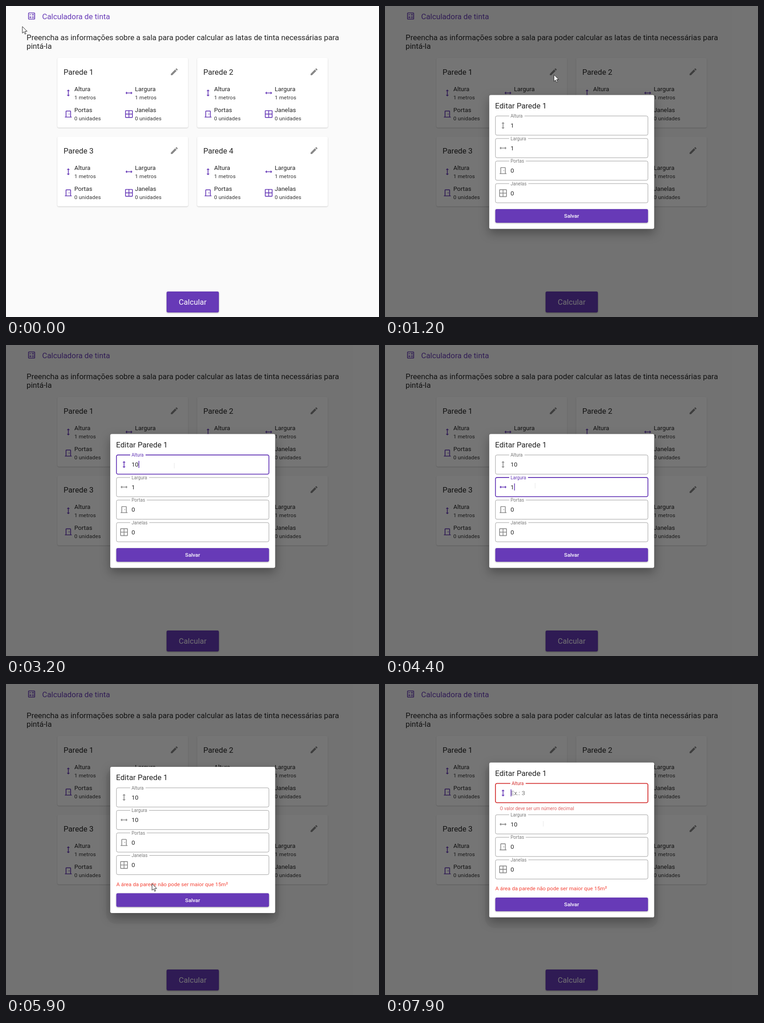
An HTML page for the animation above (8 s loop, 820 by 683 pixels).

```html
<!DOCTYPE html>
<html lang="pt-BR">
<head>
<meta charset="utf-8">
<title>Calculadora de tinta</title>
<style>
  html, body { margin: 0; width: 100%; height: 100%; overflow: hidden; background: #fafafa; }
  svg { display: block; }
  text { font-family: Roboto, Arial, sans-serif; white-space: pre; }
  .card { fill: #fff; filter: drop-shadow(0 1px 1px rgba(0,0,0,.2)); }
  .raised { filter: drop-shadow(0 1.5px 1.5px rgba(0,0,0,.35)); }
  .dialog { fill: #fff; filter: drop-shadow(0 9px 11px rgba(0,0,0,.33)); }
  .pointer { fill: #fff; stroke: #222; stroke-width: 1; stroke-linejoin: round; }
</style>
</head>
<body>
<svg id="stage" width="820" height="683" viewBox="0 0 820 683">
  <g id="page"></g>
  <g id="modal"></g>
  <g id="cursor"></g>
</svg>
<script>
const DURATION = 8000, STEP = 100;
const PURPLE = '#673ab7', INK = '#242424', RED = '#f44336', DARK_RED = '#d32f2f';
const $ = id => document.getElementById(id);
const clamp = v => Math.max(0, Math.min(1, v));
const ramp = (t, start, length) => clamp((t - start) / length);

const ICONS = {
  height: 'M13 6.99h3L12 3 8 6.99h3v10.02H8L12 21l4-3.99h-3z',
  width: 'M6.99 11V8L3 12l3.99 4v-3h10.02v3L21 12l-3.99-4v3z',
  door: 'M19 19V5c0-1.1-.9-2-2-2H7c-1.1 0-2 .9-2 2v14H3v2h18v-2zM17 19H7V5h10zM13 11h2v2h-2z',
  window: 'M20 2H4c-1.1 0-2 .9-2 2v16c0 1.1.9 2 2 2h16c1.1 0 2-.9 2-2V4c0-1.1-.9-2-2-2zM20 11h-7V4h7zM11 4v7H4V4zM4 13h7v7H4zM13 20v-7h7v7z',
  edit: 'M3 17.25V21h3.75L17.81 9.94l-3.75-3.75zM20.71 7.04c.39-.39.39-1.02 0-1.41l-2.34-2.34c-.39-.39-1.02-.39-1.41 0l-1.83 1.83 3.75 3.75z',
  calc: 'M19 3H5c-1.1 0-2 .9-2 2v14c0 1.1.9 2 2 2h14c1.1 0 2-.9 2-2V5c0-1.1-.9-2-2-2zM19 19H5V5h14zM6.25 7.72h5v1.5h-5zM13 15.75h5v1.5h-5zM13 13.25h5v1.5h-5zM8 18h1.5v-2h2v-1.5h-2v-2H8v2H6V16h2zM14.09 10.95l1.41-1.41 1.41 1.41 1.06-1.06-1.41-1.42 1.41-1.41L16.91 6 15.5 7.41 14.09 6l-1.06 1.06 1.41 1.41-1.41 1.42z'
};

const icon = (name, cx, cy, color) =>
  `<path d="${ICONS[name]}" fill="${color}" fill-rule="evenodd" transform="translate(${cx - 10.08} ${cy - 10.08}) scale(.84)"/>`;
const text = (value, x, y, size, color = INK, extra = '') =>
  `<text x="${x}" y="${y}" font-size="${size}" fill="${color}" ${extra}>${value}</text>`;
const box = (x, y, w, h, extra) =>
  `<rect x="${x}" y="${y}" width="${w}" height="${h}" ${extra}/>`;
const mix = (from, to, k) => 'rgb(' + from.map((v, i) => Math.round(v + (to[i] - v) * k)) + ')';

function wallCard(number, x, y) {
  const stat = (name, dx, dy, label, value) =>
    icon(name, x + dx, y + dy, PURPLE) +
    text(label, x + dx + 13.2, y + dy - 4, 13.44) +
    text(value, x + dx + 13.2, y + dy + 14, 11.76, '#333', 'letter-spacing=".12"');
  return box(x, y, 287.3, 153, 'rx="3.4" class="card"') +
    text('Parede ' + number, x + 13.5, y + 37, 16.8) +
    (number === 1 ? `<circle id="hover" cx="370" cy="144.5" r="20" fill="#ececec"/>` : '') +
    icon('edit', x + 257, y + 30.5, '#888') +
    stat('height', 24, 77, 'Altura', '1 metros') +
    stat('width', 157.3, 77, 'Largura', '1 metros') +
    stat('door', 24, 123.3, 'Portas', '0 unidades') +
    stat('window', 157.3, 123.3, 'Janelas', '0 unidades');
}

$('page').innerHTML =
  box(0, 0, 820, 683, 'fill="#fafafa"') +
  icon('calc', 56.3, 22, PURPLE) +
  text('Calculadora de tinta', 79.5, 28.5, 16.8, PURPLE) +
  text('Preencha as informações sobre a sala para poder calcular as latas de tinta necessárias para', 45.3, 74.7, 16.8) +
  text('pintá-la', 45.3, 94.4, 16.8) +
  [1, 2, 3, 4].map(n => wallCard(n, n % 2 ? 113 : 420.2, n < 3 ? 114 : 287)).join('') +
  box(353, 627, 115, 46, `rx="3.4" fill="${PURPLE}" class="raised"`) +
  text('Calcular', 410.3, 656.3, 16.8, '#fff', 'text-anchor="middle"');

// name, label, label width
const FIELDS = [
  ['height', 'Altura', 26.8], ['width', 'Largura', 34.4],
  ['door', 'Portas', 29.4], ['window', 'Janelas', 35.1]
];

// Value in force from the given time on
const at = (table, t) => table.filter(row => row[0] <= t).pop();

const VALUES = [
  [[0, '1'], [3200, '10'], [7500, '1'], [7700, '']],
  [[0, '1'], [4600, '10']],
  [[0, '0']],
  [[0, '0']]
];
const CARET = [[0, 0], [2100, 1], [2500, 0], [3000, 1], [3700, 0], [4300, 1], [5200, 0], [7200, 1]];

function focusLevels(t) {
  return [
    ramp(t, 2030, 167) - ramp(t, 4130, 200) + ramp(t, 7130, 167),
    ramp(t, 4130, 200) - ramp(t, 5130, 167),
    0, 0
  ];
}

function field(i, y, t, focus, invalid) {
  const [name, label, labelWidth] = FIELDS[i];
  const value = at(VALUES[i], t)[1];
  const bad = invalid > 0;
  const shake = bad ? -2.6 * Math.sin(invalid * Math.PI * 2) * (invalid < 1) : 0;
  const violet = [103, 58, 183];
  const line = bad ? DARK_RED : mix([158, 158, 158], violet, focus);
  let out =
    box(242.8, y, 335.2, 42.2, `rx="3.4" fill="none" stroke="${line}" stroke-width="${1 + .8 * focus}"`) +
    box(273 + shake, y - 2, labelWidth + 7, 4, 'fill="#fff"') +
    text(label, 276 + shake, y + 3.5, 10.08, bad ? DARK_RED : mix([122, 122, 122], violet, focus)) +
    icon(name, 259.5, y + 21, mix([138, 138, 138], violet, focus)) +
    (value ? text(value, 276, y + 25.6, 13.44) : bad ? text('Ex.: 3', 276, y + 25.6, 13.44, '#777') : '');
  if (focus > .3 && at(CARET, t)[1])
    out += box(276.3 + value.length * 7.55, y + 13, 1.6, 15.5, `fill="${PURPLE}"`);
  return out;
}

function modal(t) {
  if (t < 1200) return '';
  const areaError = t >= 5300;
  const invalid = ramp(t, 7660, 300);
  const grow = 19.4 * (1 - (1 - invalid) ** 3);
  const height = 294 + (areaError ? 27 : 0) + grow;
  const top = 342.5 - height / 2;
  const focus = focusLevels(t);
  const buttonTop = top + height - 43.5;
  const ripple = ramp(t, 5150, 550);
  let out = box(0, 0, 820, 683, 'fill="#000" fill-opacity=".54"');
  if (areaError)
    out += box(220, top + 2, 380, height + 21.5, 'rx="22" fill="#000" fill-opacity=".035"');
  out += box(229.2, top, 362.5, height, 'rx="3.4" class="dialog"') +
    text('Editar Parede 1', 242, top + 29.3, 16.8) +
    FIELDS.map((_, i) =>
      field(i, top + 46 + i * 49.5 + (i ? grow : 0), t, focus[i], i ? 0 : invalid)).join('');
  if (invalid)
    out += text('O valor deve ser um número decimal', 252.6, top + 104.5, 10.08, DARK_RED, `opacity="${.75 * invalid + .15}"`);
  if (areaError)
    out += text('A área da parede não pode ser maior que 15m²', 242.5, buttonTop - 16, 11.76, RED);
  out += box(242.5, buttonTop, 335.7, 30, `rx="3.4" fill="${PURPLE}" class="raised"`);
  if (t >= 4900 && t < 5800)
    out += box(242.5, buttonTop, 335.7, 30, 'rx="3.4" fill="#fff" fill-opacity=".08"');
  if (ripple > 0 && ripple < 1)
    out += `<clipPath id="clip">${box(242.5, buttonTop, 335.7, 30, 'rx="3.4"')}</clipPath>` +
      `<circle cx="322" cy="${buttonTop + 15}" r="${20 + 330 * ripple}" fill="#fff" fill-opacity="${.24 * (1 - ripple)}" clip-path="url(#clip)"/>`;
  return out + text('Salvar', 410.2, buttonTop + 19.3, 11.76, '#fff', 'font-weight="500" text-anchor="middle"');
}

const POINTERS = {
  arrow: '<path class="pointer" d="M0 0V14.6L3.4 11.5 5.7 16.8 8 15.8 5.7 10.6H10.4z"/>',
  hand: '<path class="pointer" d="M-1.5 1.5a1.5 1.5 0 0 1 3 0V7c1-.8 2.5-.5 2.8.6 1-.6 2.4-.3 2.6.8 1-.5 2.2 0 2.2 1.3V13c0 2-1 3-1.5 4v2H0v-2C-2 15-3 12.5-4.5 11c-1-1.2.6-2.8 2-1.7l1 1z"/>',
  beam: '<path d="M0-6V6" stroke="#e6e6e6" stroke-width="1"/>'
};
// time, x, y, pointer
const PATH = [
  [0, 36, 45, 'arrow'], [100, 44, 110, 'arrow'], [200, 54.5, 174, 'arrow'],
  [400, 90, 174, 'arrow'], [500, 180, 172, 'arrow'], [600, 280, 167, 'arrow'], [700, 350, 156, 'arrow'],
  [800, 372, 152, 'hand'], [1200, 371.5, 151, 'arrow'],
  [1500, 358, 188, 'arrow'], [1600, 343.5, 222, 'arrow'], [1700, 350, 240, 'arrow'], [1800, 370, 265, 'beam'],
  [3600, 330, 275, 'arrow'], [3700, 330, 309, 'beam'],
  [4700, 330, 416, 'arrow'], [4900, 322, 458, 'hand'], [5800, 322, 448, 'arrow'], [5900, 321, 438.5, 'arrow'],
  [6100, 375, 428, 'arrow'], [6200, 412, 400, 'beam'], [6300, 408, 371, 'arrow'], [6400, 385, 322, 'arrow'],
  [6500, 345, 273, 'arrow'], [6600, 305, 254, 'beam'], [6700, 288, 252, 'beam'],
  [7400, 310, 270, 'beam'], [7500, 348, 307, 'beam']
];

function draw(t) {
  $('hover').setAttribute('opacity', t < 1200 ? ramp(t, 650, 150) : 0);
  $('modal').innerHTML = modal(t);
  const [, x, y, pointer] = at(PATH, t);
  $('cursor').innerHTML = `<g transform="translate(${x} ${y})">${POINTERS[pointer]}</g>`;
}

const start = performance.now();
let shown = -1;
function tick() {
  const elapsed = (performance.now() - start) % DURATION;
  const t = Math.floor(elapsed / STEP) * STEP;
  if (t !== shown) draw(shown = t);
  requestAnimationFrame(tick);
}
tick();
</script>
</body>
</html>
```
